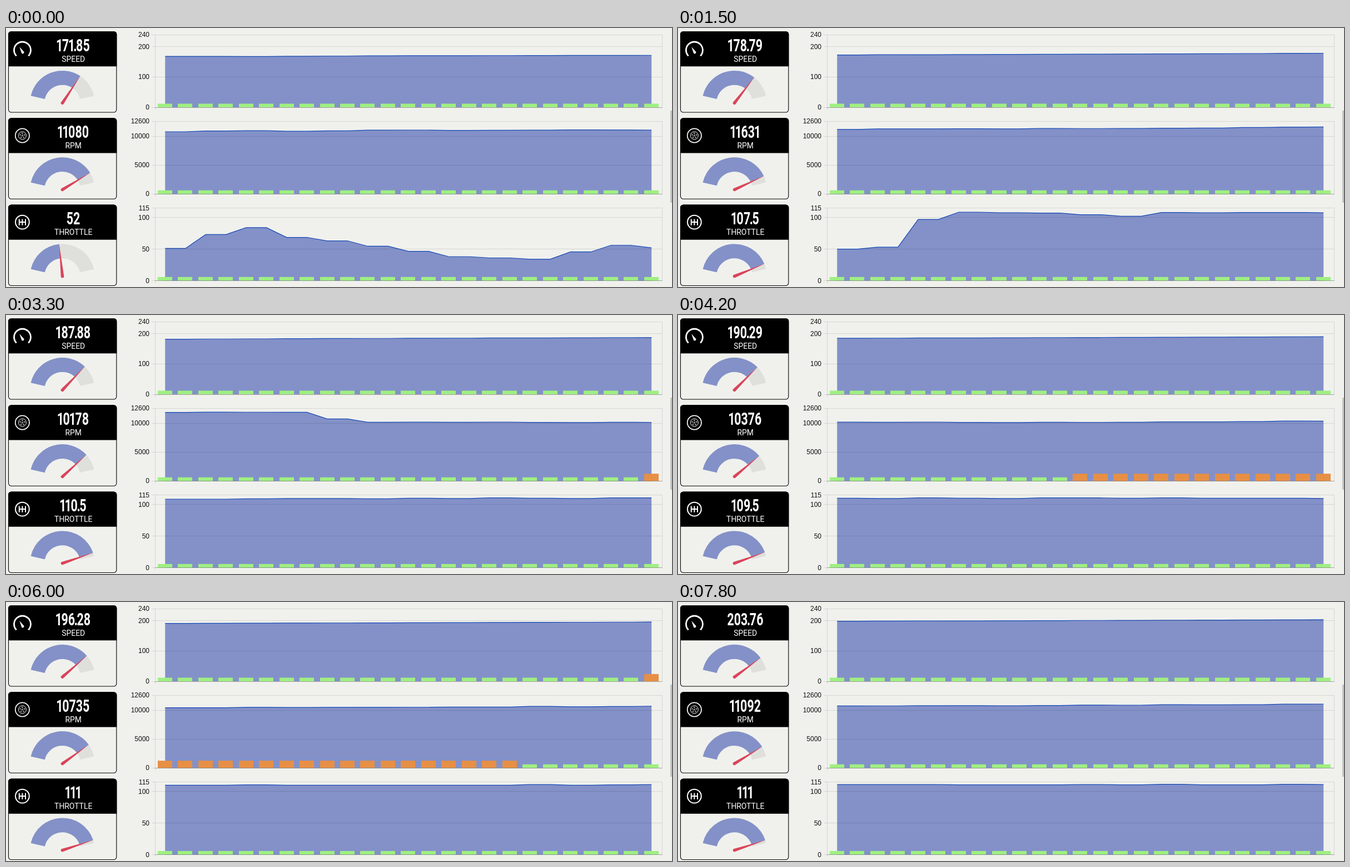
Recreate the animation shown at these times as an HTML page. Size 1198 by 467 pixels, loop 8000 ms.

```html
<!DOCTYPE html>
<html lang="en">
<head>
<meta charset="utf-8">
<title>Telemetry</title>
<style>
  html, body { margin: 0; width: 100%; height: 100%; overflow: hidden; background: #f0f1ed; }
  svg { position: absolute; left: 0; top: 0; }
  .num {
    position: absolute; left: 41px; width: 160px; height: 36px; white-space: nowrap;
    text-align: center; color: #fff;
    font: 700 31px/36px Roboto, sans-serif; transform: scaleX(.69);
  }
  .num i { font-style: normal; margin: 0 -2px; }
  .name { font: 13.9px Roboto, sans-serif; fill: #fff; text-anchor: middle; }
  .tick { font: 12px "Liberation Sans", Arial, sans-serif; fill: #111; text-anchor: end; }
  .icon { fill: none; stroke: #fff; stroke-width: 2; }
  .grid { fill: none; stroke: #000; stroke-opacity: .11; }
</style>
</head>
<body>
<svg id="stage" width="1198" height="467" viewBox="0 0 1198 467"></svg>
<script>
const LOOP = 8000, TICK = 100, POINTS = 25, TAIL = 12;
const LEFT = 268, RIGHT = 1179.4, HEIGHT = 130.9, PITCH = 156.25;
const BAND = (RIGHT - LEFT) / POINTS, BAR = 26;
const BLUE = '#8391c8', GREEN = '#9fef82', ORANGE = '#e78f45';

// keys: [sample, value], joined by straight runs with seeded jitter between them
const panels = [
  {
    name: 'SPEED', max: 240, ticks: [0, 100, 200], alert: [65, 66], jitter: .4, digits: 2, unit: .01,
    keys: [[0, 168.5], [2, 168.1], [5, 170.4], [12, 171.85], [22, 176.22], [34, 182.87],
      [45, 187.88], [57, 193.01], [65, 196.28], [69, 198.6], [81, 203.76]]
  },
  {
    name: 'RPM', max: 12600, ticks: [0, 5000, 10000], alert: [45, 61], jitter: 110, digits: 0, unit: 1,
    keys: [[0, 10804], [2, 10990], [3, 10880], [5, 11080], [12, 11080], [17, 11300], [22, 11363],
      [28, 11750], [34, 11940], [36, 11920], [37, 10762], [38, 10184], [45, 10178], [50, 10400],
      [57, 10526], [65, 10735], [72, 10820], [81, 11092]]
  },
  {
    name: 'THROTTLE', max: 115, ticks: [0, 50, 100], jitter: 1.4, unit: .5,
    keys: [[0, 51], [1, 73], [2, 84], [3, 68.5], [4, 63], [7, 38], [9, 34], [11, 56], [12, 52],
      [13, 42], [14, 54], [15, 50], [16, 53], [17, 97], [18, 108.5], [20, 107], [22, 102], [23, 108],
      [34, 108.5], [45, 110.5], [57, 110], [65, 111], [81, 111]]
  }
];

function noise(n) {
  const x = Math.sin(n * 12.9898) * 43758.5453;
  return x - Math.floor(x) - .5;
}
function value({ keys, jitter, unit }, s) {
  const i = Math.max(1, keys.findIndex(k => k[0] >= s));
  const [a, va] = keys[i - 1], [b, vb] = keys[i];
  const wobble = s === a || s === b ? 0 : jitter * noise(s);
  return Math.round((va + (vb - va) * (s - a) / (b - a) + wobble) / unit) * unit;
}

// Bursts of data: [first tick, last tick, window start at the end]; one sample per tick
const bursts = [[0, 33, 33], [35, 36, 35], [38, 38, 37], [42, 48, 45],
  [52, 59, 53], [62, 64, 56], [66, 68, 60], [70, 78, 69]];

function stateAt(tick) {
  const [, last, end] = bursts.filter(b => b[0] <= tick).pop();
  return { head: end - Math.max(0, last - tick), settled: tick >= last + 2 };
}

const stage = document.getElementById('stage');
function add(tag, attrs, text) {
  const el = document.createElementNS('http://www.w3.org/2000/svg', tag);
  for (const k in attrs) el.setAttribute(k, attrs[k]);
  if (text !== undefined) el.textContent = text;
  stage.appendChild(el);
  return el;
}
const line = (d, w) => add('path', { d, class: 'icon', style: `stroke-width:${w}` });
const ring = (x, y, r, w) => add('circle', { cx: x, cy: y, r, class: 'icon', style: `stroke-width:${w}` });

const icons = [
  y => {
    line(`M18.7 ${y + 50.4}A15 15 0 1 1 40.3 ${y + 50.4}`, 2.8);
    add('path', { d: `M24.3 ${y + 34}L32.3 ${y + 43.1}A2.4 2.4 0 0 1 28.2 ${y + 45.5}Z`, fill: '#fff' });
  },
  y => {
    ring(29.4, y + 37.7, 12.6, 1.7);
    ring(29.4, y + 37.7, 7, 1);
    for (let i = 0; i < 5; i++) {
      const a = i * Math.PI * .4 - Math.PI / 2;
      ring(29.4 + 4 * Math.cos(a), y + 37.7 + 4 * Math.sin(a), .9, .8);
    }
    ring(29.4, y + 37.7, 1, .9);
  },
  y => {
    ring(29.4, y + 37.6, 12.4, 2);
    line(`M23.8 ${y + 32}v11.2M29.4 ${y + 32}v11.2M35 ${y + 32}v11.2M23.8 ${y + 37.6}h11.2`, 2);
  }
];

const START = 167.1, SPAN = 154.2;
function polar(cy, r, deg) {
  const a = deg * Math.PI / 180;
  return `${(101.5 + r * Math.cos(a)).toFixed(2)} ${(cy - r * Math.sin(a)).toFixed(2)}`;
}
function arc(cy, from, to) {
  return `M${polar(cy, 58.3, from)}A58.3 58.3 0 0 1 ${polar(cy, 58.3, to)}` +
    `L${polar(cy, 32.5, to)}A32.5 32.5 0 0 0 ${polar(cy, 32.5, from)}Z`;
}

panels.forEach((p, i) => {
  const y = i * PITCH;
  p.base = 143 + y;
  p.hub = 135.2 + y;

  add('rect', { x: 4.5, y: y + 6.5, width: 194.3, height: 145.5, rx: 5, fill: 'none', stroke: '#000', 'stroke-width': 1.1 });
  add('path', { d: `M4 ${y + 69.3}V${y + 11.5}a5.5 5.5 0 0 1 5.5-5.5H193.8a5.5 5.5 0 0 1 5.5 5.5V${y + 69.3}Z` });
  icons[i](y);
  add('text', { x: 121.2, y: y + 60.5, class: 'name' }, p.name);
  p.num = document.createElement('div');
  p.num.className = 'num';
  p.num.style.top = y + 13.9 + 'px';
  document.body.appendChild(p.num);

  add('path', { d: arc(p.hub, START, START - SPAN), fill: '#dfe0dc' });
  p.arc = add('path', { fill: BLUE });
  p.needle = add('path', { fill: '#d9455a' });

  p.area = add('path', { fill: BLUE });
  let grid = '';
  for (const v of [...p.ticks, p.max]) {
    const ly = p.base - v / p.max * HEIGHT;
    grid += `M262 ${Math.floor(ly) + .5}H1180.5`;
    add('text', { x: 258, y: ly + 4, class: 'tick' }, v);
  }
  const top = Math.floor(p.base - HEIGHT) + .5, low = Math.floor(p.base) + .5;
  add('path', { d: grid + `M${LEFT + .5} ${top}V${low + 4}M1180.5 ${top}V${low}`, class: 'grid' });
  p.line = add('path', { fill: 'none', stroke: '#1648b5', 'stroke-width': 1.2 });
  p.bars = Array.from({ length: POINTS }, (_, k) =>
    add('rect', { x: Math.floor(LEFT + BAND * (k + .5) - BAR / 2 + .2), width: BAR }));
  add('path', { d: `M${LEFT} ${low}H1180.5`, stroke: '#000', 'stroke-opacity': .25 });
});
add('rect', { x: 1195, y: 149, width: 3, height: 166, fill: '#c3c4c1' });

function draw({ head, settled }) {
  for (const p of panels) {
    const [from, to] = p.alert || [];
    const pts = p.bars.map((bar, k) => {
      const s = head + (k >> 1);
      const hot = s >= from && s <= to;
      const h = HEIGHT * (hot ? .1 : .05);
      bar.setAttribute('y', p.base - h);
      bar.setAttribute('height', h);
      bar.setAttribute('fill', hot ? ORANGE : GREEN);
      const x = LEFT + BAND * (k + .5), y = p.base - value(p, s) / p.max * HEIGHT;
      return `${x.toFixed(2)} ${y.toFixed(2)}`;
    });
    const path = 'M' + pts.join('L');
    p.line.setAttribute('d', path);
    p.area.setAttribute('d', `${path}V${p.base}H${LEFT + BAND / 2}Z`);

    const now = value(p, head + TAIL), before = value(p, head + TAIL - 1);
    const text = p.digits === undefined ? String(now) : now.toFixed(p.digits);
    p.num.innerHTML = text.replace(/[1.]/g, '<i>$&</i>');

    // The needle trails the newest sample until the data pauses
    const dial = settled ? now : now + .3 * (before - now);
    const deg = START - SPAN * dial / p.max;
    p.arc.setAttribute('d', arc(p.hub, START, deg));
    p.needle.setAttribute('d', `M${polar(p.hub, 2.8, deg + 90)}L${polar(p.hub, 58.3, deg)}` +
      `L${polar(p.hub, 2.8, deg - 90)}A2.8 2.8 0 0 1 ${polar(p.hub, 2.8, deg + 90)}Z`);
  }
}

const t0 = performance.now();
let shown = -1;
function frame() {
  const tick = Math.floor((performance.now() - t0) % LOOP / TICK);
  if (tick !== shown) draw(stateAt(shown = tick));
  requestAnimationFrame(frame);
}
frame();
</script>
</body>
</html>
```
